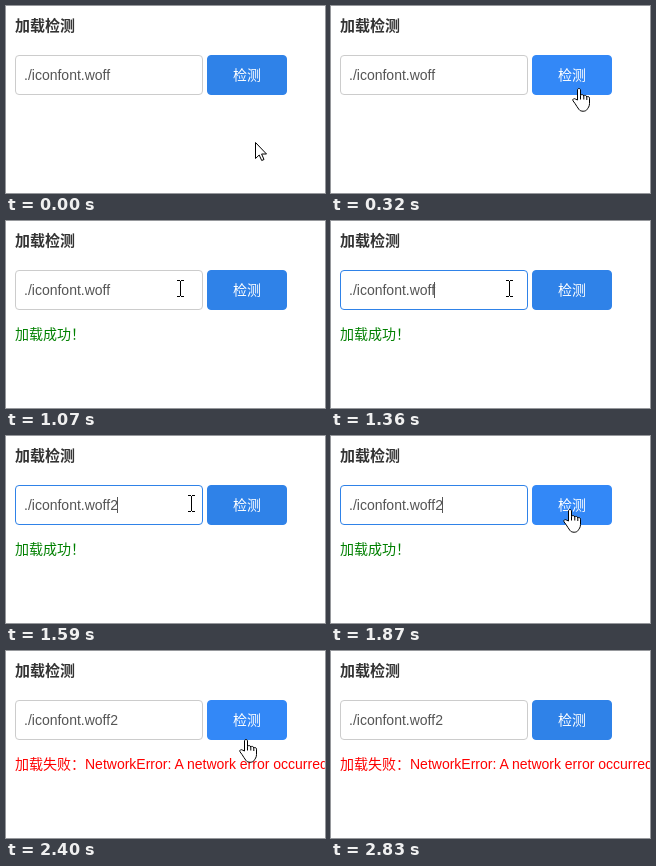
Animation of 319 by 187 pixels, one loop 3220 ms. Source, as an HTML page with a canvas:

```html
<!DOCTYPE html>
<html lang="zh">
<head>
<meta charset="utf-8">
<style>
html, body { margin: 0; width: 100%; height: 100%; overflow: hidden; background: #fff; }
canvas { display: block; width: 319px; height: 187px; }
</style>
</head>
<body>
<canvas id="stage" width="319" height="187"></canvas>
<script>
const ctx = document.getElementById('stage').getContext('2d');
const LOOP = 3220;
const FAMILY = '"Liberation Sans", "Noto Sans CJK SC", "Noto Sans CJK", sans-serif';
const BLUE = '#2f82e8', HOVER = '#3388f7', PRESSED = '#2d7adf';

// Kerns across spaces as well, as page text does.
ctx.fontKerning = 'normal';
ctx.textRendering = 'optimizeLegibility';

// Each pointer pose holds until the next: time, shape, hotspot.
const pointer = [
  [0, 'arrow', 249, 136], [60, 'arrow', 249, 129], [140, 'arrow', 249, 112],
  [230, 'hand', 248, 88], [320, 'hand', 248, 82],
  [910, 'hand', 238, 79], [980, 'hand', 207, 71], [1070, 'beam', 174, 67],
  [1130, 'beam', 178, 67], [1590, 'beam', 185, 67], [1650, 'beam', 191, 67],
  [1730, 'hand', 214, 69], [1800, 'hand', 231, 72], [1870, 'hand', 239, 73],
  [2400, 'hand', 240, 88], [2480, 'arrow', 250, 108], [2550, 'arrow', 263, 123],
  [2620, 'arrow', 279, 140], [2690, 'arrow', 296, 158], [2760, 'arrow', 311, 175],
  [2830, 'none', 0, 0]
];
const buttonFill = [
  [0, BLUE], [230, HOVER], [630, PRESSED], [690, HOVER], [1070, BLUE],
  [1730, HOVER], [1950, PRESSED], [2020, HOVER], [2480, BLUE]
];
const inputBorder = [[0, '#cccccc'], [1210, '#8db7e8'], [1360, BLUE], [1950, '#cccccc']];
const message = [
  [0, '', '#fff'], [690, '加载成功！', '#008000'],
  [2020, '加载失败：NetworkError: A network error occurred.', '#ff0000']
];

const at = (track, t) => track.findLast(step => step[0] <= t);

function text(str, x, y, color, size = 14, weight = 'normal') {
  ctx.font = `${weight} ${size}px ${FAMILY}`;
  ctx.fillStyle = color;
  ctx.fillText(str, x, y);
}

function box(x, y, w, h, fill, border) {
  ctx.beginPath();
  ctx.roundRect(x + 0.5, y + 0.5, w - 1, h - 1, 3.5);
  ctx.fillStyle = fill;
  ctx.fill();
  ctx.strokeStyle = border;
  ctx.lineWidth = 1;
  ctx.stroke();
}

const arrowShape = new Path2D('M.5.5V16.5L4.2 13 6.7 18.5 9 17.5 6.6 12H11.5Z');
const handShape = new Path2D(
  'M-1.5 12V2C-1.5 0 1.5 0 1.5 2V7.5C2 6.2 4.5 6.2 4.8 8' +
  'C5.4 6.9 7.6 7.2 7.8 9C8.5 8 10.5 8.5 10.5 10.2V15.5C10.5 18.5 9 20 8 21.5' +
  'C6.8 23.8 1.5 23.8 0 21.5C-1 19.8-3 17.5-4 15.5L-6 12.8C-7 11-4.6 10-3.3 11.2Z');
const handFolds = new Path2D('M1.5 7.5V11.5M4.8 8V11.5M7.8 9V12');

const cursors = {
  none() {},
  arrow() { outlined(arrowShape); },
  hand() {
    outlined(handShape);
    ctx.stroke(handFolds);
  },
  beam() {
    ctx.fillStyle = '#000';
    ctx.fillRect(0, -7, 1, 15);
    for (const y of [-8, 8]) {
      ctx.fillRect(-3, y, 3, 1);
      ctx.fillRect(1, y, 3, 1);
    }
  }
};

function outlined(shape) {
  ctx.fillStyle = '#fff';
  ctx.strokeStyle = '#000';
  ctx.lineWidth = 1;
  ctx.lineJoin = 'round';
  ctx.fill(shape);
  ctx.stroke(shape);
}

function draw(t) {
  ctx.fillStyle = '#fff';
  ctx.fillRect(0, 0, 319, 187);
  text('加载检测', 9, 25, '#333333', 15, 'bold');

  box(9, 49, 188, 40, '#fff', at(inputBorder, t)[1]);
  const value = './iconfont.woff' + (t >= 1430 ? '2' : '');
  text(value, 18, 74, '#555555');
  if (t >= 1210 && t < 1950) {
    ctx.fillRect(Math.floor(18 + ctx.measureText(value).width - 0.5), 61, 1, 16);
  }

  const fill = at(buttonFill, t)[1];
  box(201, 49, 80, 40, fill, fill === PRESSED ? HOVER : fill);
  text('检测', 227, 74, '#fff');

  const [, note, noteColor] = at(message, t);
  text(note, 9, 118, noteColor);

  const [, shape, x, y] = at(pointer, t);
  ctx.save();
  ctx.translate(x, y);
  cursors[shape]();
  ctx.restore();
}

const start = performance.now();
function frame() {
  draw((performance.now() - start) % LOOP);
  requestAnimationFrame(frame);
}
frame();
</script>
</body>
</html>
```
